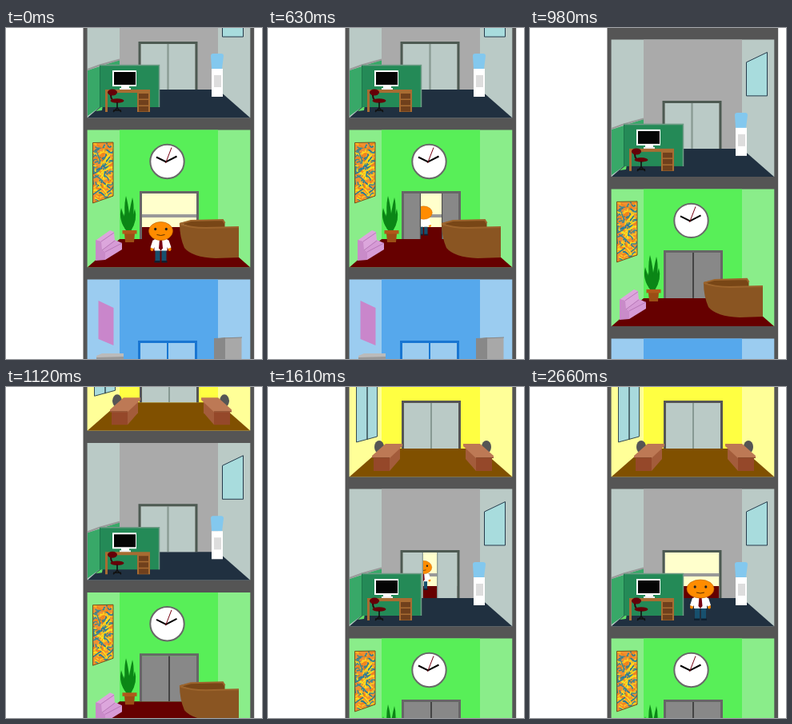
Write an HTML page with a canvas that moves like this. It is 320 px wide and 414 px high and loops after 2.87 s.

```html
<!DOCTYPE html>
<html lang="en">
<head>
<meta charset="utf-8">
<title>Elevator ride</title>
<style>
html, body { margin: 0; width: 100%; height: 100%; overflow: hidden; background: #fff; }
canvas { display: block; }
</style>
</head>
<body>
<canvas id="stage" width="320" height="414"></canvas>
<script>
const ctx = document.getElementById('stage').getContext('2d');
const LOOP = 2870, STEP = 70, PITCH = 187, STORY = 171;
const DOOR = { left: 170, mid: 204, right: 238, top: 79, bottom: 136 };

const lerp = (a, b, p) => a + (b - a) * p;
const progress = (t, from, to) => Math.min(1, Math.max(0, (t - from) / (to - from)));

function rect(color, x, y, w, h) {
  ctx.fillStyle = color;
  ctx.fillRect(x, y, w, h);
}
function paint(fill, stroke, width = 1) {
  if (fill) { ctx.fillStyle = fill; ctx.fill(); }
  if (stroke) { ctx.strokeStyle = stroke; ctx.lineWidth = width; ctx.stroke(); }
}
function poly(points, fill, stroke, width) {
  ctx.beginPath();
  for (let i = 0; i < points.length; i += 2) ctx.lineTo(points[i], points[i + 1]);
  ctx.closePath();
  paint(fill, stroke, width);
}
function oval(x, y, rx, ry, fill, stroke, width) {
  ctx.beginPath();
  ctx.ellipse(x, y, rx, ry, 0, 0, Math.PI * 2);
  paint(fill, stroke, width);
}
function line(color, width, x1, y1, x2, y2) {
  ctx.beginPath();
  ctx.moveTo(x1, y1);
  ctx.lineTo(x2, y2);
  paint(null, color, width);
}
function path(d, fill, stroke, width) {
  const shape = new Path2D(d);
  if (fill) { ctx.fillStyle = fill; ctx.fill(shape); }
  if (stroke) { ctx.strokeStyle = stroke; ctx.lineWidth = width || 1; ctx.stroke(shape); }
}

function drawMan({ x, y, scale, headWidth, back, swing }) {
  ctx.save();
  ctx.translate(x, y);
  ctx.scale(scale, scale);
  for (const side of [-1, 1]) {
    const lift = Math.max(0, side * swing) * 3;
    rect('#17506e', side < 0 ? -7 : 1, -16, 6, 14 - lift);
    rect('#102030', side < 0 ? -8 : 1, -2.5 - lift, 7, 2.5);
    oval(side * 11, -17, 2, 2.5, '#ff8c00');
    poly([side * 6, -29, side * 10, -28, side * 13, -19, side * 9, -17.5, side * 6, -22], '#fff');
  }
  rect('#fff', -8, -30, 16, 15);
  if (!back) poly([-1.5, -29, 1.5, -29, 2.5, -18, 0, -15, -2.5, -18], '#780010');
  oval(0, -39.5, headWidth, 11.5, '#ff8c00', '#b86000', 0.6);
  if (!back) {
    oval(-6.8, -42, 1.6, 1.8, '#222');
    oval(6.8, -42, 1.6, 1.8, '#222');
    path('M-5 -35Q0 -33 5 -35', null, '#5a3000', 1);
  }
  ctx.restore();
}

function drawDoors({ frame, door, seam, doorShift = 0 }, open, rider) {
  const { left, mid, right, top, bottom } = DOOR;
  ctx.save();
  ctx.translate(doorShift, 0);
  ctx.save();
  ctx.beginPath();
  ctx.rect(left, top, right - left, bottom - top);
  ctx.clip();
  if (open > 0) {
    rect('#ffffcc', left, top, 68, 42);
    rect('#999', left, 105, 68, 4);
    rect('#660000', left, 121, 68, 15);
    if (rider) drawMan({ ...rider, x: rider.x - doorShift });
  }
  const shift = open * 35;
  rect(door, left - shift, top, mid - left, 60);
  rect(door, mid + shift, top, right - mid, 60);
  line(seam, 1, mid - shift - .5, top, mid - shift - .5, bottom);
  line(seam, 1, mid + shift + .5, top, mid + shift + .5, bottom);
  ctx.restore();
  path('M168.5 136V77.5H239.5V136', null, frame, 3);
  ctx.restore();
}

function drawPainting() {
  let seed = 11;
  const random = () => (seed = seed * 16807 % 2147483647) / 2147483647;
  const edge = [108.5, 15.5, 134, 15, 134, 82, 108.5, 91];
  ctx.save();
  poly(edge, '#f09030');
  ctx.clip();
  const colors = ['#247b98', '#ffe21c', '#f28218', '#35869a', '#ffc820'];
  for (let i = 0; i < 150; i++) {
    const x = 106 + random() * 30, y = 14 + random() * 77;
    ctx.beginPath();
    ctx.moveTo(x, y);
    ctx.quadraticCurveTo(x + random() * 16 - 8, y + random() * 12 - 6,
      x + random() * 24 - 12, y + random() * 24 - 12);
    paint(null, colors[i % 5], 1.5);
  }
  ctx.restore();
  poly(edge, null, '#75501c', 1);
}

function furnishOffice() {
  poly([270.5, 28, 296.5, 15.5, 296.5, 70, 270.5, 70], '#a8dcdd', '#263b4c');
  ctx.translate(0, 1);
  poly([102, 111, 142, 98, 142, 104, 117, 104, 117, 157, 102, 168], '#38a868');
  path('M102 110L117 104.5L142 97.5', null, '#999', 2);
  poly([112, 162, 121, 155, 120, 161], '#5fdc68');
  rect('#248a57', 117, 104, 75, 53);
  path('M117 104.5H191.5V157', null, '#6f9b86', 1.5);
  line('#1c754a', 1, 117.5, 105, 117.5, 157);
  rect('#fff', 144, 130, 10, 5);
  rect('#fff', 133, 111, 30, 20);
  rect('#050505', 135, 113, 27, 16);
  rect('#eee', 142, 133, 14, 3);
  rect('#a86c32', 124, 135, 56, 4);
  rect('#a86c32', 124, 138, 3, 25);
  rect('#a86c32', 164, 138, 16, 25);
  for (const y of [140, 148, 156]) rect('#70401c', 166, y, 12, 6.5);
  oval(133, 138.5, 6, 4, '#650008');
  path('M131 142Q131 150 139 149', null, '#33000a', 2);
  oval(139, 149, 8.5, 2.8, '#650008');
  path('M139 151V159M139 158L134 163M139 158L144 163M134 161H144', null, '#111', 1.6);
  path('M257 109L256 93Q256 90 259 90H269Q272 90 272 93L270 109Z', '#83c8ee');
  rect('#fff', 257, 109, 14, 35);
  rect('#ddd', 260, 117, 9, 15);
}

function furnishLobby() {
  oval(201.5, 39, 21.2, 21.2, '#fff', '#686868', 2);
  path('M188 33.5L200 39.5L213.5 32.5', null, '#000', 2);
  line('#760010', 1, 199.5, 41, 207, 21.5);
  drawPainting();
  // sofa: back, seat, then the side facing the viewer
  poly([113, 137, 130, 125, 135, 127, 136, 138, 120, 150], '#dca6dc');
  poly([120, 150, 136, 137, 145, 141, 145, 149, 124, 162], '#d69bd6');
  poly([112, 137, 119, 139, 120, 150, 124, 152, 124, 162, 112, 163], '#c98bc9');
  path('M119 139L135 128M120 150L136 138M124 152L145 141', null, '#b878b8', 1);
  const leaves = [[144, 97], [148, 103], [150, 82], [158, 84], [161, 98]];
  for (const [x, y] of leaves)
    path(`M151 126Q${x - 4} ${y + 16} ${x} ${y}Q${x + 4} ${y + 14} 156 126Z`, '#0b8616');
  poly([148, 129, 161, 129, 160, 140, 149, 140], '#9b4e15');
  rect('#b0591a', 145.5, 125, 18, 4.5);
  poly([217, 116, 231, 113, 271, 112, 273.5, 116, 273.5, 123, 238, 123], '#784616');
  path('M217 117Q230 122 250 122L291 121V159L262 160Q233 159 223 147Q217 133 217 117Z', '#8a5522');
  path('M217 117L231 113L271 112L273.5 116', null, '#9c642c', 2);
  path('M217 117Q230 122 250 122L291 121', null, '#9c642c', 2);
}

function furnishYellow() {
  poly([110.5, 32, 136.5, 42, 136.5, 121, 110.5, 128], '#a8dadd', '#354a50');
  line('#354a50', 1.5, 124, 36, 124, 125);
  for (const flip of [false, true]) {
    ctx.save();
    if (flip) { ctx.translate(412, 0); ctx.scale(-1, 1); }
    oval(139, 134, 6, 8, '#555');
    poly([152, 147, 165, 135, 165, 149, 152, 164], '#a35c3b');
    rect('#95482a', 132, 147, 20, 17);
    poly([130, 145, 147, 130, 168, 130, 168, 133, 152, 148, 130, 148], '#bd7955');
    line('#8a4a2c', 1, 130, 147.5, 152, 147.5);
    ctx.restore();
  }
}

function furnishBlue() {
  poly([115.5, 26, 134.5, 35, 134.5, 82, 115.5, 74], '#c986cb');
  rect('#999', 113, 95, 34, 40);
  poly([113, 95, 120, 92, 147, 92, 147, 96, 113, 97], '#bbb');
  poly([260, 74, 274, 72, 274, 140, 260, 140], '#888');
  rect('#a8a8a8', 274, 72, 20.5, 70);
  line('#888', 1, 260, 73.5, 295, 72);
}

const rooms = [
  { top: -246, wall: '#ffff42', side: '#ffff98', floor: '#805000', frame: '#555', door: '#bacac6', seam: '#879993', furnish: furnishYellow },
  { top: -59, wall: '#aaa', side: '#bacac6', floor: '#203040', frame: '#4d5a52', door: '#bacac6', seam: '#7b8c84', doorShift: -1.5, furnish: furnishOffice },
  { top: 128, wall: '#58ef58', side: '#8aed8a', floor: '#660000', frame: '#666', door: '#888', seam: '#444', furnish: furnishLobby },
  { top: 315, wall: '#56a8ec', side: '#9bccf0', floor: '#245a90', frame: '#1976d2', door: '#9bccf0', seam: '#1976d2', doorShift: -2, furnish: furnishBlue }
];
const [, office, lobby] = rooms;

// Room coordinates: y is measured from the ceiling of the room.
function manAt(t) {
  if (t < 840) {
    const p = progress(t, 0, 630);
    return {
      room: lobby, inside: t > 490, back: t > 0,
      x: lerp(193.5, 194.5, p), y: lerp(165.5, 131.5, p), scale: lerp(1, .72, p),
      headWidth: 15, swing: p > 0 && p < 1 ? Math.sin(t / 65) : 0
    };
  }
  const p = progress(t, 1820, 2660);
  return {
    room: office, inside: t < 2040, back: false,
    x: lerp(194, 213, p), y: lerp(126, 164, p), scale: lerp(.72, 1, p),
    headWidth: lerp(15, 17, p), swing: p > 0 && p < 1 ? Math.sin(t / 65) : 0
  };
}

function draw(t) {
  const scroll = PITCH * (1 - (1 - progress(t, 840, 1470)) ** 2);
  const man = manAt(t);
  rect('#fff', 0, 0, 320, 414);
  rect('#555', 96.5, 0, 213.7, 414);
  for (const room of rooms) {
    const y = room.top + scroll;
    if (y > 414 || y + STORY < 0) continue;
    let open = 0;
    if (room === lobby) open = 1 - progress(t, 280, 840);
    if (room === office) open = progress(t, 1470, 2030);
    const here = man.room === room;
    ctx.save();
    ctx.translate(0, y);
    ctx.beginPath();
    ctx.rect(101.6, -.4, 203.7, STORY + .6);
    ctx.clip();
    rect(room.side, 101, -1, 205, STORY + 2);
    rect(room.wall, 142, -1, 123, 138);
    poly([142, 136, 265, 136, 306, STORY + 1, 101, STORY + 1], room.floor);
    drawDoors(room, open, here && man.inside && man);
    ctx.save();
    room.furnish();
    ctx.restore();
    if (here && !man.inside) drawMan(man);
    ctx.restore();
  }
}

function tick() {
  const t = performance.now() % LOOP;
  draw(Math.min(2660, Math.floor(t / STEP) * STEP));
  requestAnimationFrame(tick);
}
tick();
</script>
</body>
</html>
```
